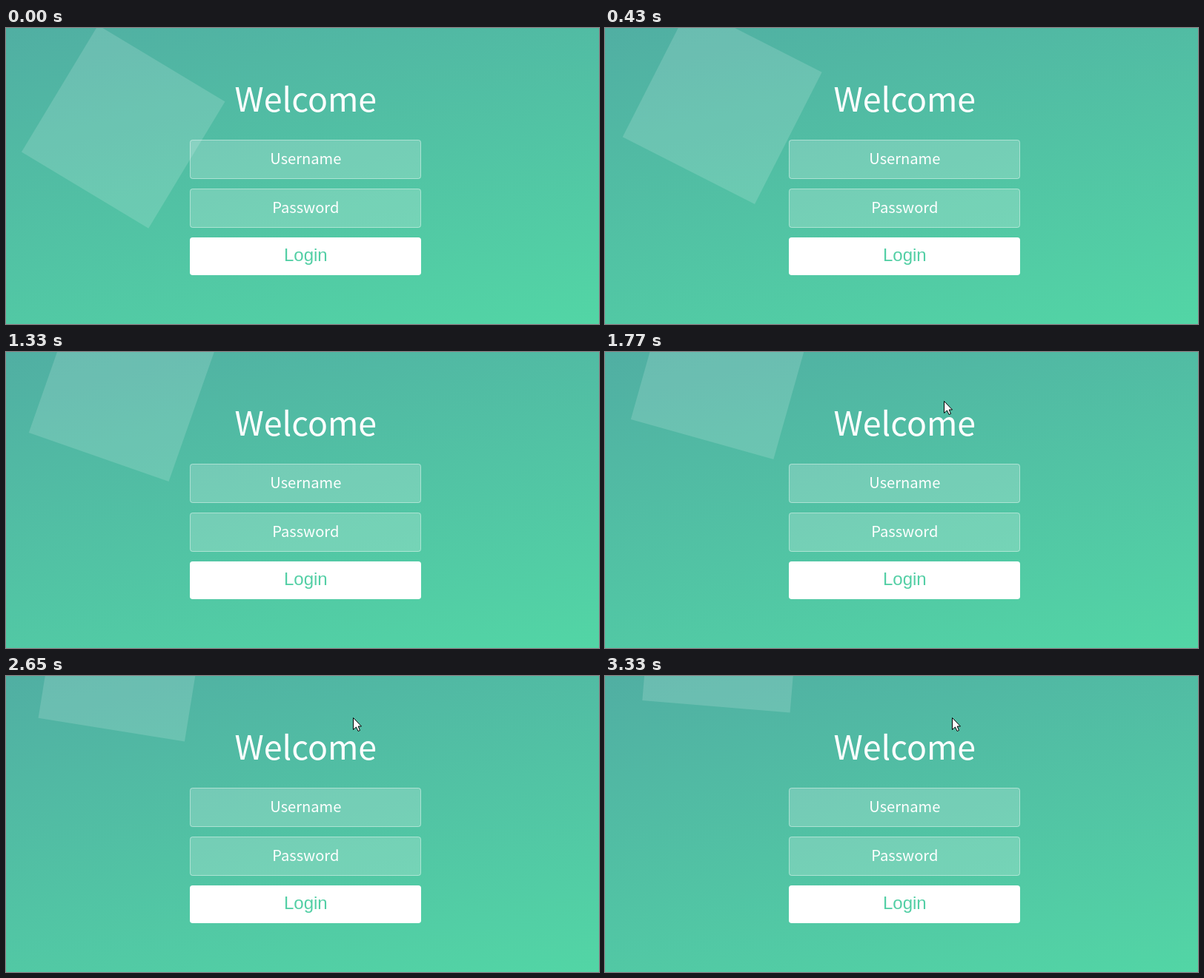
Write an HTML page with a canvas that moves like this. It is 800 px wide and 400 px high and loops after 3.43 s.

```html
<!DOCTYPE html>
<html lang="en">
<head>
<meta charset="utf-8">
<title>Welcome</title>
<style>
html, body { margin: 0; width: 100%; height: 100%; overflow: hidden; background: #52c4a4; }
canvas { display: block; width: 800px; height: 400px; }
</style>
</head>
<body>
<canvas id="stage" width="800" height="400"></canvas>
<script>
const ctx = document.getElementById('stage').getContext('2d');
const LOOP = 3430;
const SANS = '"Noto Sans CJK JP", "Noto Sans CJK SC", "Noto Sans", sans-serif';

// start time of each step
const STEPS = [0, 100, 220, 330, 430, 550, 670, 770, 870, 990, 1110, 1210, 1330, 1430, 1550, 1650,
  1770, 1870, 1990, 2090, 2210, 2330, 2430, 2550, 2650, 2770, 2890, 2990, 3110, 3210, 3330];

// the page is a 1920 x 500 panel of which the stage shows a part
const PANEL = { x: -556, y: -36.7, w: 1920, h: 500 };

function makeBackground() {
  const { x, y, w, h } = PANEL;
  const k = w * h / (w * w + h * h);
  const cx = x + w / 2, cy = y + h / 2;
  const dx = h * k, dy = w * k;
  const g = ctx.createLinearGradient(cx - dx, cy - dy, cx + dx, cy + dy);
  g.addColorStop(0, '#50a3a2');
  g.addColorStop(1, '#53e3a6');
  return g;
}
const background = makeBackground();

function drawSquare(step) {
  const p = 0.4912 + 0.00875 * step - 0.000048 * step * step;
  ctx.save();
  ctx.translate(158.2, 563.3 - 875 * p);
  ctx.rotate(-120 * p * Math.PI / 180);
  ctx.fillStyle = 'rgba(255,255,255,0.15)';
  ctx.fillRect(-100, -100, 200, 200);
  ctx.restore();
}

function roundBox(x, y, w, h, r) {
  ctx.beginPath();
  ctx.roundRect(x, y, w, h, r);
}

function label(text, y, font, color) {
  ctx.font = font;
  ctx.fillStyle = color;
  ctx.fillText(text, 404.3, y);
}

function drawField(text, y) {
  roundBox(248, y, 312, 53, 3.75);
  ctx.fillStyle = 'rgba(255,255,255,0.2)';
  ctx.fill();
  roundBox(248.5, y + 0.5, 311, 52, 3.25);
  ctx.strokeStyle = 'rgba(255,255,255,0.4)';
  ctx.lineWidth = 1;
  ctx.stroke();
  label(text, y + 33, '300 20.1px ' + SANS, '#fff');
}

function drawForm() {
  ctx.textAlign = 'center';
  label('Welcome', 113, '100 44.7px ' + SANS, '#fff');
  drawField('Username', 151);
  drawField('Password', 217);
  roundBox(248, 283, 312, 51, 3.75);
  ctx.fillStyle = '#fff';
  ctx.fill();
  label('Login', 315, '24px "Liberation Sans", sans-serif', '#53cfa5');
}

function drawCursor(step) {
  if (step < 16) return;
  const u = Math.min(1, (step - 16) / 5);
  const ease = 1 - (1 - u) * (1 - u);
  const x = Math.round(457 + 11 * ease), y = Math.round(66 - 10 * ease);
  const shape = [[0, 0], [0, 16], [4, 12.5], [6.5, 18], [9, 17], [6.7, 11.5], [11, 11.5]];
  ctx.beginPath();
  for (const [px, py] of shape) ctx.lineTo(x + px + 0.5, y + py + 0.5);
  ctx.closePath();
  ctx.fillStyle = '#fff';
  ctx.fill();
  ctx.strokeStyle = '#000';
  ctx.lineWidth = 1;
  ctx.stroke();
}

function draw(time) {
  const t = time % LOOP;
  const step = STEPS.findLastIndex(s => s <= t);
  ctx.fillStyle = background;
  ctx.fillRect(0, 0, 800, 400);
  drawSquare(step);
  drawForm();
  drawCursor(step);
}

const start = performance.now();
function tick() {
  draw(performance.now() - start);
  requestAnimationFrame(tick);
}
tick();
</script>
</body>
</html>
```
